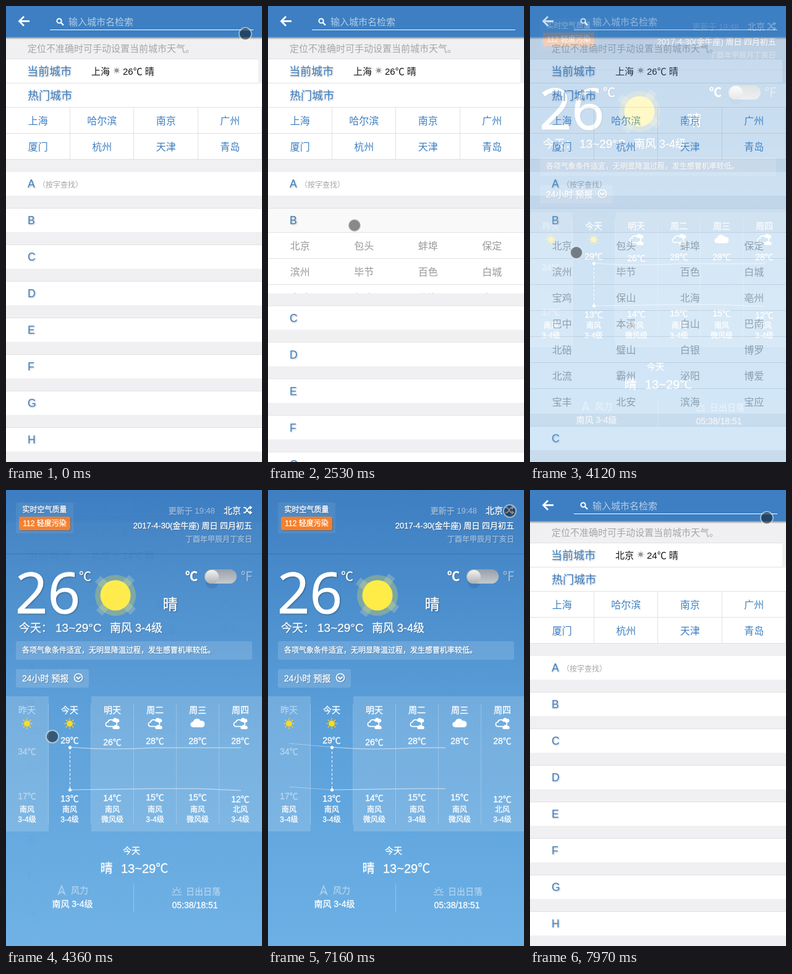
Write an HTML page that moves like this. It is 414 px wide and 736 px high and loops after 8000 ms.

```html
<!DOCTYPE html>
<html lang="zh-CN">
<head>
<meta charset="utf-8">
<title>天气</title>
<style>
html, body { margin: 0; width: 100%; height: 100%; overflow: hidden; background: #f0f0f2; }
svg { display: block; width: 414px; height: 736px; }
text { font-family: "Liberation Sans", "Noto Sans CJK SC", "Noto Sans CJK", sans-serif; white-space: pre; stroke-width: 0; }
.weather text { stroke-width: .3px; }
.raised { filter: drop-shadow(1px 1px 1px rgba(0,0,0,.3)); }
.soft { filter: drop-shadow(1px 1px 0 rgba(0,0,0,.2)); }

/* One shared 8 s timeline: 1% = 80 ms */
.cursor, .rest, .hover, .before, .after, .weather, .chart, .spin, .ripple {
  animation: 8s linear infinite;
}
.cursor { animation-name: cursor; animation-timing-function: ease-in-out; }
.rest { animation-name: rest; }
.hover { animation-name: hover; }
.before { animation-name: before; }
.after { animation-name: after; }
.weather { animation-name: weather; animation-timing-function: ease; }
.chart { animation-name: chart; }
.spin { animation-name: spin; }
.ripple { animation-name: ripple; transform-origin: 391px 45px; }

@keyframes cursor {
  0%, 2.2% { transform: translate(387px, 45px); }
  8% { transform: translate(156px, 30px); }
  9.2%, 11.2% { transform: translate(168px, 30px); }
  20.5%, 21.7% { transform: translate(140px, 319px); }
  25.2%, 30.4% { transform: translate(139px, 353px); }
  33.8%, 35.6% { transform: translate(142px, 357px); }
  42.8%, 69.5% { transform: translate(75px, 398px); }
  71.3% { transform: translate(59px, 396px); animation-timing-function: ease-in; }
  75.8% { transform: translate(211px, 310px); animation-timing-function: ease-out; }
  81%, 82% { transform: translate(391px, 45px); }
  86%, 93.2% { transform: translate(391px, 34px); }
  99.4%, 100% { transform: translate(383px, 45px); }
}
@keyframes rest {
  0%, 30.4% { transform: translateY(0); animation-timing-function: ease-in-out; }
  33.9%, 50.5% { transform: translateY(378px); }
  55%, 100% { transform: translateY(0); }
}
@keyframes hover {
  0%, 30.3% { opacity: 0; }
  30.4%, 50.5% { opacity: 1; }
  55%, 100% { opacity: 0; }
}
@keyframes before { 0%, 51.9% { opacity: 1; } 52%, 100% { opacity: 0; } }
@keyframes after { 0%, 51.9% { opacity: 0; } 52%, 100% { opacity: 1; } }
@keyframes weather {
  0%, 50.5% { opacity: 0; }
  55.5%, 91.5% { opacity: 1; }
  96.5%, 100% { opacity: 0; }
}
@keyframes chart {
  0%, 60.9% { clip-path: inset(0 34px 0 103px); }
  61% { clip-path: inset(0 380px 0 0); }
  100% { clip-path: inset(0 34px 0 0); }
}
@keyframes spin { from { transform: rotate(-88deg); } to { transform: rotate(152deg); } }
@keyframes ripple {
  0%, 90.5% { transform: scale(0); opacity: 1; }
  93% { transform: scale(3.2); opacity: 1; }
  96.5%, 100% { transform: scale(7); opacity: 0; }
}
</style>
</head>
<body>
<svg id="stage" viewBox="0 0 414 736">
  <defs>
    <linearGradient id="sky" x2="0" y2="1"><stop stop-color="#3e7ec1"/><stop offset=".5" stop-color="#5a9fd9"/><stop offset="1" stop-color="#6cb0e5"/></linearGradient>
    <linearGradient id="track" x2="0" y2="1"><stop stop-color="#989fa6"/><stop offset="1" stop-color="#c3cad0"/></linearGradient>
    <linearGradient id="knob" x2="0" y2="1"><stop stop-color="#f4f4f4"/><stop offset="1" stop-color="#adb0b3"/></linearGradient>
    <linearGradient id="fall" x2="0" y2="1"><stop stop-opacity=".45"/><stop offset="1" stop-opacity="0"/></linearGradient>
    <path id="cloud" d="M-7 6a4.5 4.5 0 0 1-.5-9a6.5 6.5 0 0 1 12-1.5a5.3 5.3 0 0 1 3 10.5z"/>
  </defs>
</svg>
<script>
const BLUE = '#3d7fc2', WHITE = '#fff', DIM = 'rgba(255,255,255,.42)', LINE = '#e1e1e3', GREY = '#a6a6a6';

const rect = (x, y, w, h, fill, r = 0) =>
  `<rect x="${x}" y="${y}" width="${w}" height="${h}" fill="${fill}" rx="${r}"/>`;

// y is the optical middle of the line
const text = (x, y, size, str, fill = WHITE, anchor = 'start', extra = '') =>
  `<text x="${x}" y="${y + size * .37}" font-size="${size}" fill="${fill}" stroke="${fill}" text-anchor="${anchor}" ${extra}>${str}</text>`;

const mid = (x, y, size, str, fill) => text(x, y, size, str, fill, 'middle');
const end = (x, y, size, str, fill) => text(x, y, size, str, fill, 'end');
const group = (cls, ...parts) => `<g class="${cls}">${parts.join('')}</g>`;
const at = (x, y, body) => `<g transform="translate(${x} ${y})">${body}</g>`;
const stroke = (d, color, width, extra = '') =>
  `<path d="${d}" fill="none" stroke="${color}" stroke-width="${width}" ${extra}/>`;

const sunIcon = (x, y, r, color) => at(x, y,
  `<circle r="${r}" fill="${color}"/><circle r="${r * 1.45}" fill="none" stroke="${color}" stroke-width="${r * .5}" pathLength="16" stroke-dasharray=".5 1.5" stroke-dashoffset=".25"/>`);

const cloud = (x, y, scale, fill = WHITE, width = 0) =>
  `<use href="#cloud" fill="${fill}" stroke="#fff" stroke-width="${width}" transform="translate(${x} ${y}) scale(${scale})"/>`;
const cloudIcon = (x, y) => at(x, y, cloud(0, 0, 1));
const cloudsIcon = (x, y) => at(x, y,
  cloud(5, -5, .55) + cloud(-1.5, 0, .78, '#68ade3', 2.3) + cloud(6, 6, .5, WHITE, 0));

const cityGrid = (names, top, color) => names.split(' ').map((name, i) =>
  mid(51.7 + 103.5 * (i % 4), top + 21 + 42 * Math.floor(i / 4), 16, name, color)).join('');

const section = (letter, top) =>
  rect(0, top, 414, 1, LINE) + rect(0, top + 1, 414, 38, WHITE) +
  group('raised', text(35, top + 20, 17.5, letter, BLUE));

function cityPage() {
  const current = (cls, city, temp) => group(cls,
    text(138, 105, 15, city, '#111'), text(189, 105, 15, temp + '℃ 晴', '#111'));
  const hot = '上海 哈尔滨 南京 广州 厦门 杭州 天津 青岛';
  const listB = '北京 包头 蚌埠 保定 滨州 毕节 百色 白城 宝鸡 保山 北海 亳州 巴中 本溪 白山 巴南 ' +
    '北碚 璧山 白银 博罗 北流 霸州 泌阳 博爱 宝丰 北安 滨海 宝应 巴彦淖尔 博兴 泊头 宾县 ' +
    '柏乡 博野 巴林左旗 巴林右旗';
  const rows = [...Array(9).keys()].map(i => rect(0, 365 + 42 * i, 414, 1, LINE)).join('');
  const columns = [103, 206, 310, 413].map(x => rect(x, 164, 1, 84, LINE)).join('');
  return group('',
    rect(0, 0, 414, 736, '#f0f0f2'),
    text(35, 68, 15, '定位不准确时可手动设置当前城市天气。', GREY),
    rect(0, 85, 408, 40, LINE), rect(0, 86, 408, 38, WHITE),
    rect(0, 125, 414, 123, WHITE),
    rect(0, 163, 414, 1, LINE), rect(0, 205, 414, 1, LINE), rect(0, 247, 414, 1, LINE), columns,
    group('raised', text(34, 105, 18, '当前城市', BLUE), text(35, 144, 18, '热门城市', BLUE)),
    sunIcon(179, 104, 3.3, '#999'),
    current('before', '上海', 26), current('after', '北京', 24),
    cityGrid(hot, 164, BLUE),
    rect(0, 268, 414, 38, WHITE),
    group('raised', text(35, 287, 17.5, 'A', BLUE)),
    text(52, 289, 12, '（按字查找）', GREY),
    rect(0, 365, 414, 371, WHITE), rows, cityGrid(listB, 366, '#999'),
    section('B', 326),
    group('hover', rect(0, 327, 414, 38, 'rgba(0,0,0,.025)')),
    group('rest', rect(0, 365, 414, 400, '#f0f0f2'),
      ...[...'CDEFGH'].map((letter, i) => section(letter, 385 + 59 * i))),
    rect(0, 50, 414, 4, 'url(#fall)'),
    rect(0, 0, 414, 50, BLUE),
    stroke('M38 24.5H22M29 17l-7.5 7.5L29 32', WHITE, 2.8),
    '<circle cx="86" cy="24" r="3.6" fill="none" stroke="#fff" stroke-width="2"/>',
    stroke('M88.5 26.5l4.5 4.5', WHITE, 2.4),
    text(101, 25, 15, '输入城市名检索', '#b5cde7'),
    rect(71, 38, 329, 1, WHITE));
}

function header() {
  return group('soft',
    mid(62.5, 32, 12, '实时空气质量'),
    rect(21, 43, 83, 22, '#f77f2a', 3),
    mid(62.5, 54, 12, '112 轻度污染'),
    end(338, 33, 13, '更新于 19:48', DIM),
    text(352, 33, 14, '北京'),
    stroke('M384 28.5h3l6 8h3M384 36.5h3l6-8h3', WHITE, 2),
    `<path d="M394 25l4.5 3.5l-4.5 3.5zM394 33l4.5 3.5l-4.5 3.5z" fill="#fff"/>`,
    end(398, 57, 13, '2017-4-30(金牛座) 周日 四月初五'),
    end(398, 80, 12, '丁酉年甲辰月丁亥日', DIM));
}

function now() {
  const ray = a => `<rect x="-6.5" y="-39" width="13" height="18" fill="rgba(255,250,190,.22)" transform="rotate(${a})"/>`;
  return group('raised',
      '<text x="15" y="199" font-size="92" fill="#fff" stroke="#fff" style="font-family:\'Open Sans\',\'Noto Sans\',sans-serif;stroke-width:1px">26</text>',
      text(118, 140, 20, '℃'), text(253.5, 184, 24, '晴')) +
    at(177, 170, group('spin', ...[0, 90, 180, 270].map(ray)) +
      '<circle r="33" fill="rgba(255,235,60,.27)"/><circle r="24.5" fill="#ffec47"/>') +
    group('soft',
      text(21, 222, 18, '今天：'), text(80, 222, 19, '13~29°C'), text(168, 222, 18, '南风 3-4级'),
      text(290, 140, 20, '℃', WHITE, 'start', 'font-weight="bold"'), text(379, 140, 20, '℉', DIM),
      text(26, 259, 12, '各项气象条件适宜，无明显降温过程，发生感冒机率较低。'),
      text(26, 304, 14, '24小时 预报'),
      '<circle cx="117" cy="303" r="6.5" fill="none" stroke="#fff" stroke-width="1.6"/>',
      stroke('M113.5 301.5l3.5 3.5l3.5-3.5', WHITE, 1.8)) +
    '<ellipse cx="333" cy="150" rx="10" ry="9" fill="rgba(0,30,70,.12)"/>' +
    rect(321, 128, 52, 23, 'url(#track)', 11.5) +
    '<circle cx="333" cy="140" r="11" fill="url(#knob)"/>';
}

function forecast() {
  const days = [
    ['昨天', 34, 17, 422, 494, '南风', '3-4级'],
    ['今天', 29, 13, 404, 498, '南风', '3-4级'],
    ['明天', 26, 14, 407, 497, '南风', '微风级'],
    ['周二', 28, 15, 405, 496, '南风', '3-4级'],
    ['周三', 28, 15, 405, 496, '南风', '微风级'],
    ['周四', 28, 12, 405, 499, '北风', '3-4级'],
  ];
  const icons = [0, 0, 1, 1, 2, 1];
  const draw = [(x, y) => sunIcon(x, y, 5, '#ffd91f'), cloudsIcon, cloudIcon];
  const labels = days.map(([day, high, low, highY, lowY, wind, level], i) => {
    const x = 34 + 69 * i, tint = i ? WHITE : DIM;
    return mid(x, 355, 14, day, tint) + draw[icons[i]](x, 377) +
      mid(x, highY, 14, high + '℃', tint) + mid(x, lowY, 14, low + '℃', tint) +
      mid(x, 516, 12, wind) + mid(x, 532, 12, level) +
      (i ? rect(x - 35, 345, 1, 195, 'rgba(255,255,255,.22)') : '');
  });
  const thin = 'rgba(255,255,255,.65)', faint = 'rgba(255,255,255,.35)';
  return rect(0, 333, 69, 218, 'rgba(255,255,255,.16)') + rect(138, 333, 276, 218, 'rgba(255,255,255,.16)') +
    labels.join('') +
    `<svg width="414" height="736" class="chart">` +
      rect(0, 0, 414, 736, 'none') +
      stroke('M34 409L103 415M34 479L103 484', faint, 1) +
      stroke('M103 415Q140 418 172 418T241 416L380 416M103 484L172 483L241 482L310 482L380 485', thin, 1) +
    '</svg>' +
    stroke('M103.5 415V484', WHITE, 1, 'stroke-dasharray="4 3"') +
    '<circle cx="103.5" cy="415.5" r="2.6" fill="#fff"/><circle cx="103.5" cy="484" r="2.6" fill="#fff"/>';
}

function details() {
  return mid(203, 582, 14, '今天') + text(152.5, 611, 20, '晴') + text(186, 611, 20, '13~29℃') +
    rect(206, 635, 1, 47, 'rgba(255,255,255,.3)') +
    stroke('M90 639l5 13l-5-4l-5 4z', DIM, 1.8) +
    text(105, 646, 14, '风力', DIM) + mid(107.5, 668, 14, '南风 3-4级') +
    stroke('M272.5 651a4 4 0 1 1 7 0M268 653.5h16M276 641v2.5M270 643.5l2 2M282 643.5l-2 2M268 649h2.5M281.5 649h2.5', DIM, 1.7) +
    text(291, 648, 14, '日出日落', DIM) + mid(305.5, 670, 14, '05:38/18:51');
}

const weatherPage = () => group('weather',
  rect(0, 0, 414, 736, 'url(#sky)'),
  rect(0, 102, 414, 2, 'rgba(0,20,70,.1)'),
  rect(16, 20, 93, 50, 'rgba(255,255,255,.07)', 2),
  rect(16, 244, 382, 30, 'rgba(255,255,255,.14)', 3),
  rect(16, 289, 118, 30, 'rgba(255,255,255,.14)', 3),
  header(), now(), forecast(), details());

document.getElementById('stage').insertAdjacentHTML('beforeend',
  cityPage() + weatherPage() +
  '<circle class="ripple" cx="391" cy="45" r="100" fill="rgba(0,0,0,.05)"/>' +
  group('cursor', '<circle r="10" fill="rgba(0,0,0,.45)"/><circle r="10" fill="none" stroke="rgba(255,255,255,.5)" stroke-width="2"/>'));
</script>
</body>
</html>
```
